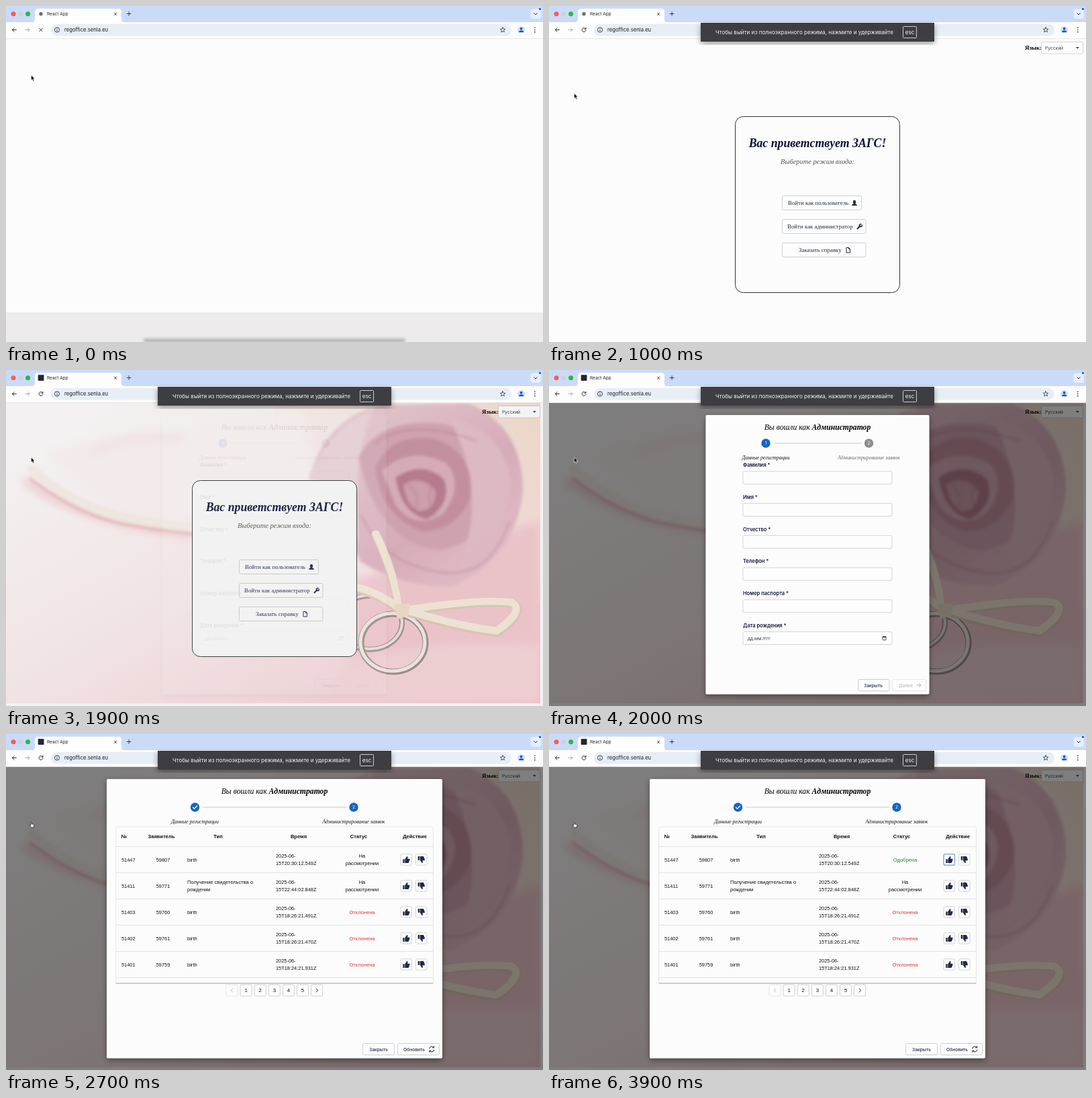
Write an HTML page that moves like this. It is 800 px wide and 500 px high and loops after 4000 ms.

```html
<!DOCTYPE html>
<html lang="ru">
<head>
<meta charset="utf-8">
<title>Registry office demo</title>
<style>
  html, body { margin: 0; width: 100%; height: 100%; overflow: hidden; background: #fcfcfc; }
  svg { display: block; }
  text { white-space: pre; }
  .ui { font-family: Inter, sans-serif; }
  .serif { font-family: "Liberation Serif", serif; }
  .table { font-family: "Liberation Sans", sans-serif; }
  .line { fill: none; stroke-linecap: round; stroke-linejoin: round; }
</style>
</head>
<body>
<svg id="stage" width="800" height="500" viewBox="0 0 800 500"></svg>
<script>
const NAVY = '#202945', BLUE = '#1565c0';

const text = (x, y, str, size, { font = 'ui', fill = '#1f1f1f', anchor = 'start', weight = 400, italic = false } = {}) =>
  `<text class="${font}" x="${x}" y="${y}" font-size="${size}" fill="${fill}" text-anchor="${anchor}" font-weight="${weight}"${italic ? ' font-style="italic"' : ''}>${str}</text>`;
const rect = (x, y, w, h, fill, rx = 0, extra = '') =>
  `<rect x="${x}" y="${y}" width="${w}" height="${h}" rx="${rx}" fill="${fill}" ${extra}/>`;
const box = (x, y, w, h, stroke = '#c9c9ce', fill = '#fdfdfd') => rect(x, y, w, h, fill, 2, `stroke="${stroke}" stroke-width=".8"`);
const circle = (x, y, r, fill, extra = '') => `<circle cx="${x}" cy="${y}" r="${r}" fill="${fill}" ${extra}/>`;
const shape = (d, fill, extra = '') => `<path d="${d}" fill="${fill}" ${extra}/>`;
const line = (d, stroke = '#333', width = 1, extra = '') =>
  `<path class="line" d="${d}" stroke="${stroke}" stroke-width="${width}" ${extra}/>`;
const at = (x, y, body, extra = '') => `<g transform="translate(${x} ${y}) ${extra}">${body}</g>`;
const group = (id, body, extra = '') => `<g id="${id}" ${extra}>${body}</g>`;
const reloadIcon = (x, y, k = 1) => at(x, y, line('M2.6-1.6A3 3 0 1 0 3 .6M3-3.2V-1.2H1', '#333', 1), `scale(${k})`);

const defs = `<defs>
  <linearGradient id="paper" x1="0" y1="0" x2="1" y2="1">
    <stop offset=".1" stop-color="#fdfbfb"/><stop offset=".5" stop-color="#fbedee"/><stop offset="1" stop-color="#f3c9d0"/>
  </linearGradient>
  <linearGradient id="corner" x1="1" y1="0" x2="0" y2=".7">
    <stop offset="0" stop-color="#f5ddcd"/><stop offset="1" stop-color="#fbefed" stop-opacity="0"/>
  </linearGradient>
  <linearGradient id="petal" x1="0" y1="0" x2="1" y2="1">
    <stop offset="0" stop-color="#edd3da"/><stop offset=".6" stop-color="#dfb4c1"/><stop offset="1" stop-color="#edcad2"/>
  </linearGradient>
  <linearGradient id="dock" x1="0" y1="0" x2="0" y2="1">
    <stop offset="0" stop-color="#999" stop-opacity="0"/><stop offset="1" stop-color="#888"/>
  </linearGradient>
  <filter id="soft" x="-20%" y="-20%" width="140%" height="140%"><feGaussianBlur stdDeviation="2"/></filter>
  <filter id="haze" x="-20%" y="-20%" width="140%" height="140%"><feGaussianBlur stdDeviation="7"/></filter>
  <filter id="shadow" x="-10%" y="-10%" width="120%" height="125%"><feDropShadow dx="0" dy="3" stdDeviation="4" flood-opacity=".4"/></filter>
  <clipPath id="frame"><rect y="49" width="796" height="447"/></clipPath>
</defs>`;

const photo = group('photo', `
  ${rect(0, 49, 796, 447, 'url(#paper)')}${rect(400, 49, 396, 300, 'url(#corner)')}
  <g filter="url(#haze)">
    ${shape('M60 125Q150 90 280 90L440 60L470 190L300 225Q150 210 60 125Z', '#fdf5f5')}
    ${line('M130 122Q180 95 260 100', '#f9e6e7', 8)}
    ${line('M30 166Q110 225 280 245', '#f3c3c6', 8)}
    ${shape('M500 320L796 225V496H520Z', '#f4cbd2')}
    ${shape('M500 440Q620 395 796 410V496H480Z', '#f6d7da')}
  </g>
  <g filter="url(#soft)">
    ${line('M38 148Q105 205 180 221T290 236', '#f8f0e9', 13)}
    ${line('M36 162Q110 218 180 230T290 244', '#efbec1', 4)}
    ${shape('M455 150Q480 70 560 52L690 50Q770 85 770 180Q760 280 665 322Q585 322 528 285Q500 220 455 150Z', 'url(#petal)')}
    ${shape('M450 160Q480 90 550 55Q515 120 525 255Q490 190 450 160Z', '#eed7dc')}
    ${shape('M525 130Q555 70 650 80Q730 95 730 180Q710 260 645 268Q555 260 525 130Z', '#d8a9b8')}
    ${shape('M660 70Q740 90 752 165Q745 245 675 290Q720 190 660 70Z', '#e7c1cb')}
    ${shape('M550 145Q575 92 640 103Q700 125 692 190Q670 240 620 240Q560 220 550 145Z', '#cb95a6')}
    ${shape('M560 150Q600 112 655 138Q685 170 650 215Q610 240 580 200Z', '#dfb2bf')}
    ${shape('M580 160Q620 133 653 163Q665 200 627 222Q590 215 580 160Z', '#bd8094')}
    ${shape('M592 170Q620 155 640 180Q640 210 615 210Q595 200 592 170Z', '#d7a5b3')}
  </g>
  ${line('M528 215Q560 285 640 300T750 225M548 110Q600 70 700 105M590 165Q620 180 610 205M645 155Q620 185 640 218', '#b9788d', 2, 'opacity=".5" filter="url(#soft)"')}
  <g fill="none">
    <ellipse cx="542" cy="376" rx="48" ry="40" stroke="#a89691" stroke-width="8"/>
    <ellipse cx="542" cy="375" rx="48" ry="40" stroke="#eee5e0" stroke-width="4"/>
    <ellipse cx="577" cy="406" rx="48" ry="43" stroke="#a3938d" stroke-width="9"/>
    <ellipse cx="576" cy="405" rx="48" ry="43" stroke="#f3ece7" stroke-width="5"/>
  </g>
  ${line('M585 356Q578 300 551 245M520 325Q550 330 585 356Q680 385 732 390Q775 360 755 347Q710 340 590 360', '#e3cdbb', 14)}
  ${line('M585 354Q578 299 551 244M520 323Q550 328 585 354Q680 383 731 388Q773 359 754 346Q710 339 590 358', '#f7ebdc', 11)}
  ${shape('M578 349L602 347L599 366L583 371Z', '#f1dfcd')}
`, 'clip-path="url(#frame)"');

const loginButton = (y, width, x, label) => box(347.5, y, width, 21, '#c5c5cc') + text(x, y + 13.3, label, 8.89, { font: 'serif', fill: NAVY });
const welcome = group('welcome', `
  ${text(709, 65, 'Язык:', 8.89, { font: 'serif', weight: 700, fill: '#000' })}
  ${box(733.5, 53.5, 62, 17.5)}${text(739, 65, 'Русский', 6.7, { fill: '#444' })}${shape('M784.8 61h5l-2.5 2.8z', '#444')}
  ${rect(277.5, 164.5, 245, 262, '#fcfcfc', 12, 'stroke="#333"')}
  ${text(400, 210, 'Вас приветствует ЗАГС!', 17.78, { font: 'serif', fill: '#0c1035', anchor: 'middle', weight: 700, italic: true })}
  ${text(400, 235.3, 'Выберите режим входа:', 10.4, { font: 'serif', fill: '#555', anchor: 'middle', italic: true })}
  ${loginButton(282.5, 118, 356, 'Войти как пользователь')}
  ${loginButton(317.5, 124.5, 355, 'Войти как администратор')}
  ${loginButton(352.5, 124.5, 372, 'Заказать справку')}
  ${shape('M451 297q0-2 2.8-2.7q-1-1-1-2.8q0-2.4 2.2-2.4t2.2 2.4q0 1.800-1 2.800q2.800.7 2.800 2.700z', NAVY)}
  ${line('M459.5 331.300L463.500 327.300', NAVY, 2)}${line('M465 324.700a2 2 0 1 0 1.300 1.600', NAVY, 1.500)}
  ${shape('M443 359.500h3.500l2 2v5.500h-5.500zM446.300 359.500v2.200h2.200', 'none', `stroke="${NAVY}"`)}
`);

const title = text(400, 88.5, 'Вы вошли как <tspan font-weight="700">Администратор</tspan>', 11.7, { font: 'serif', fill: '#000', anchor: 'middle', italic: true });
const stepLabel = (x, label, fill) => text(x, 133, label, 7.9, { font: 'serif', fill, anchor: 'middle', italic: true });
const stepNumber = (x, n, fill) => circle(x, 109, 6.7, fill) + text(x, 111.3, n, 6.4, { fill: '#fff', anchor: 'middle' });
const steps = (x1, x2, label2) => line(`M${x1 + 12} 109H${x2 - 11}`, '#bdbdbd', .8)
  + stepLabel(x1, 'Данные регистрации', '#111') + stepLabel(x2, 'Администрирование заявок', label2);
const footButton = (x, w, textX, label, off) =>
  box(x, 460.5, w, 17, off ? '#e4e4e6' : '#c5c5cc') + text(textX, 471.500, label, 6.7, { fill: off ? '#bbb' : NAVY, weight: 500 });

const fields = [
  ['Фамилия', 'Озерова', 2100], ['Имя', 'Дарья', 2200], ['Отчество', 'Любомировна', 2300],
  ['Телефон', '05550100147', 2300], ['Номер паспорта', '30012745', 2400], ['Дата рождения', 'дд.мм.гггг', 0]
];
const fieldY = i => 150.8 + 47.75 * i;
const form = group('form', `
  ${rect(233.500, 67, 333, 415.500, '#fcfcfc', 2, 'filter="url(#shadow)"')}${title}
  ${steps(323, 476.500, '#666')}${stepNumber(323, 1, BLUE)}${stepNumber(476.500, 2, '#8e8e8e')}
  ${fields.map(([label, value], i) => text(289, fieldY(i) - 6.8, label + ' *', 7.5, { weight: 600, fill: '#151b3c' })
    + box(289, fieldY(i), 222, 19) + group('value' + i, text(296, fieldY(i) + 12, value, 6.6, { fill: '#333' }))).join('')}
  ${group('focus', rect(289, 0, 222, 19, 'none', 2, 'stroke="#dce6fc" stroke-width="2.5"') + rect(289, 0, 222, 19, 'none', 2, 'stroke="#8eabed" stroke-width=".9"'))}
  ${group('caret', line('M328 347.500v7.500', '#111', .7))}
  ${rect(497, 397, 5, 4.800, 'none', .500, 'stroke="#222" stroke-width=".8"')}${rect(496.700, 396.500, 5.600, 1.500, '#222')}
  ${footButton(460.500, 46.500, 469, 'Закрыть')}${footButton(511.500, 50, 521, 'Далее', true)}
  ${line('M548 469h6m-2.500-2.500l2.500 2.500l-2.500 2.500', '#aaa', .9)}
`);

const cell = (x, y, str, opts = {}) => text(x, y, str, opts.size || 7.4, { font: 'table', fill: '#111', ...opts });
const lines = (x, cy, str, opts) => {
  const parts = str.split('|');
  return parts.map((part, i) => cell(x, cy + 2.6 + (i - (parts.length - 1) / 2) * 10.4, part, opts)).join('');
};
const thumb = shape('M-5-.8h2.300v5.800h-2.300zM-2-.8L1-5q1.500 0 1.200 1.500L1.800-1.300h2.700q1 .3.700 1.500L3.700 4.300q-.3.700-1.200.7H-2z', NAVY);
const actionButtons = cy => box(588, cy - 8.300, 16.500, 16.500) + box(610.500, cy - 8.300, 16.500, 16.500)
  + at(596.300, cy, thumb) + at(618.700, cy, thumb, 'rotate(180) scale(-1 1)');
const status = (cy, str, fill) => lines(530.5, cy, str, { anchor: 'middle', fill, size: 7.55 });
const PENDING = 'На|рассмотрении', RED = '#d93636';
const rows = [
  ['51447', '59807', 'birth', '20:30:12.549'],
  ['51411', '59771', 'Получение свидетельства о|рождении', '22:44:02.848', PENDING, '#111'],
  ['51403', '59760', 'birth', '18:26:21.491', 'Отклонена', RED],
  ['51402', '59761', 'birth', '18:26:21.470', 'Отклонена', RED],
  ['51401', '59759', 'birth', '18:24:21.931', 'Отклонена', RED]
];
const tableRow = ([id, applicant, kind, time, state, fill], i) => {
  const cy = 187 + 39 * i;
  return cell(172, cy + 2.6, id) + cell(234, cy + 2.6, applicant, { anchor: 'middle' })
    + lines(270, cy, kind, { size: 7.55 }) + lines(402, cy, `2025-06-|15T${time}Z`)
    + (state ? status(cy, state, fill) : group('pending', status(cy, PENDING, '#111')) + group('approved', status(cy, 'Одобрена', '#168a1c')))
    + actionButtons(cy) + line(`M164 ${cy + 19.5}H636`, '#dcdcdc', .8);
};
const headers = [[176, '№'], [231.5, 'Заявитель'], [316, 'Тип'], [436, 'Время'], [525.5, 'Статус'], [609, 'Действие']];
const pages = ['', 1, 2, 3, 4, 5, ''].map((label, i) => {
  const x = 336.500 + 21.100 * i;
  return box(x - 8.500, 373, 17, 17, i ? '#c5c5cc' : '#e0e0e0') + cell(x, 384.300, label, { anchor: 'middle', size: 7.8 });
}).join('');
const table = group('table', `
  ${rect(150, 67, 500, 415.500, '#fcfcfc', 2, 'filter="url(#shadow)"')}${title}
  ${steps(281.500, 518, '#111')}${circle(281.500, 109, 6.700, BLUE)}${line('M278.500 109.200l2.100 2.100l4-4.300', '#fff', 1.300)}${stepNumber(518, 2, BLUE)}
  ${rect(163.500, 138, 473, 233, '#fcfcfc', 2, 'stroke="#e3e3e3" stroke-width=".8"')}${line('M164 371H636', '#aaa', 1)}
  ${headers.map(([x, label]) => cell(x, 154.600, label, { anchor: 'middle', weight: 700, size: 7.55 })).join('')}
  ${line('M164 167.500H636', '#dcdcdc', .8)}${rows.map(tableRow).join('')}
  ${group('pressed', rect(588, 178.700, 16.500, 16.500, 'none', 2, 'stroke="#7d9fe6" stroke-width="1.2"'))}
  ${pages}${line('M337.500 379l-2.300 2.500l2.300 2.500', '#aaa', .9)}${line('M462.300 379l2.300 2.500l-2.300 2.500', '#222', 1)}
  ${footButton(531.500, 47, 541, 'Закрыть')}${footButton(583.500, 62, 592, 'Обновить')}
  ${line('M630.700 468a3.500 3.500 0 0 1 6.400-1.500m.5-2v2.300h-2.300M637.700 470a3.500 3.500 0 0 1-6.400 1.500m-.5 2v-2.300h2.300', '#222', 1)}
`);

const chrome = `
  ${rect(0, 0, 800, 24, '#cadbfa')}${shape('M39 24q4 0 4-4V9q0-5 5-5h119q5 0 5 5v11q0 4 4 4z', '#fff')}
  ${circle(11, 11.700, 3.500, '#fe5b55')}${circle(21.700, 11.700, 3.500, '#d0d1d6')}${circle(32.600, 11.700, 3.500, '#2bb54a')}
  ${text(61, 14.200, 'React App', 6.5)}
  ${line('M161.400 10l3.600 3.600m0-3.600l-3.600 3.600', '#333', .9)}${line('M180.200 11.500h5.800m-2.900-2.900v5.800', '#333', .9)}
  ${rect(781.500, 4.500, 15.500, 14.500, '#e6eefc', 4)}${line('M786.900 10.800l2.200 2.200l2.200-2.200', '#222', 1)}${rect(794, 3, 3, 3, '#315bbd', 1)}
  ${rect(0, 24, 800, 25, '#fdfdfd')}${line('M0 48.600H800', '#dedede', .7)}
  ${rect(67, 27, 686, 17.500, '#e8eef6', 8.700)}
  ${line('M15.300 35.500H9.300m2.800-2.800l-2.800 2.800l2.800 2.800', '#333', 1)}${line('M29 35.500h6m-2.800-2.800l2.800 2.800l-2.800 2.800', '#aaa', 1)}
  ${circle(76, 35.500, 3.600, 'none', 'stroke="#333" stroke-width=".9"')}${line('M76 35.300v2M76 33.500v.1', '#333', .9)}
  ${text(87, 38.200, 'regoffice.senla.eu', 7.66)}
  ${line('M740 31.700l1.100 2.500l2.700.2l-2.100 1.800l.7 2.700l-2.400-1.500l-2.400 1.500l.7-2.700l-2.100-1.800l2.700-.2z', '#333', .8)}
  ${circle(767.600, 35.500, 5.700, '#d2e1fb')}${circle(767.600, 33.700, 1.900, '#1a56c4')}${shape('M764 39q0-2.700 3.600-2.700t3.600 2.700z', '#1a56c4')}
  ${[32.300, 35.500, 38.700].map(y => circle(787.800, y, .85, '#333')).join('')}
  ${group('loading', line('M49.700 33.200l4.600 4.600m0-4.600l-4.600 4.600', '#333', 1))}${group('loaded', reloadIcon(52, 35.500))}
  ${group('plainIcon', circle(52, 11.700, 2.700, '#66707c'))}${group('siteIcon', rect(47.700, 7.300, 8.800, 8.800, '#22262d', 1))}
`;

const banner = group('banner', rect(226, 25, 348, 28, '#3d3e42', 0, 'filter="url(#shadow)"')
  + text(248, 41.500, 'Чтобы выйти из полноэкранного режима, нажмите и удерживайте', 8.1, { fill: '#f5f5f5' })
  + rect(527.500, 30.500, 20, 17, 'none', 1, 'stroke="#ddd" stroke-width=".9"') + text(537.500, 41.500, 'esc', 8.1, { fill: '#f5f5f5', anchor: 'middle' }));

const arrow = group('arrow', shape('M0 0v7.600l1.700-1.500l1.200 2.700l1.400-.6l-1.200-2.600h2.300z', '#000', 'stroke="#fff" stroke-width=".6"'));
const hand = group('hand', at(38.500, 135, shape('M-1.600-3.800q.7-.7 1.300 0v2.600l3 .6q.8.3.7 1.200L2.900 4h-4L-3.400.9q0-1 .9-.7l.9.700z', '#fff', 'stroke="#222" stroke-width=".8"')));

document.getElementById('stage').innerHTML = defs + rect(0, 0, 800, 500, '#fcfcfc') + photo + welcome
  + group('backdrop', rect(0, 49, 800, 451, '#000', 0, 'opacity=".5"'))
  + form + table + chrome + banner
  + group('desktop', rect(0, 456, 800, 44, '#edebeb') + rect(205, 493, 390, 7, 'url(#dock)', 3, 'filter="url(#soft)"'))
  + arrow + hand;

const node = id => document.getElementById(id);
const show = (id, visible) => node(id).style.display = visible ? '' : 'none';

// Visible interval of each part, in ms
const schedule = {
  desktop: [0, 100], loading: [0, 500], loaded: [500, 4000], banner: [300, 4000],
  welcome: [500, 4000], photo: [1100, 4000], plainIcon: [0, 1100], siteIcon: [1100, 4000],
  backdrop: [1900, 4000], form: [1900, 2700], table: [2700, 4000],
  focus: [2100, 2700], caret: [2400, 2500],
  pending: [2700, 3100], approved: [3100, 4000], pressed: [3100, 4000],
  arrow: [0, 2700], hand: [2700, 4000]
};
fields.forEach(([, , start], i) => schedule['value' + i] = [start, 4000]);

function draw() {
  const t = performance.now() % 4000;
  for (const id in schedule) show(id, t >= schedule[id][0] && t < schedule[id][1]);
  const opacity = t < 2000 ? .08 : 1;
  node('form').setAttribute('opacity', opacity);
  node('backdrop').setAttribute('opacity', opacity);
  const active = t < 2200 ? 0 : t < 2300 ? 1 : t < 2400 ? 3 : t < 2500 ? 4 : 5;
  node('focus').setAttribute('transform', `translate(0 ${fieldY(active)})`);
  node('arrow').setAttribute('transform', `translate(37.5 ${t < 100 ? 103 : 130})`);
  requestAnimationFrame(draw);
}
draw();
</script>
</body>
</html>
```
